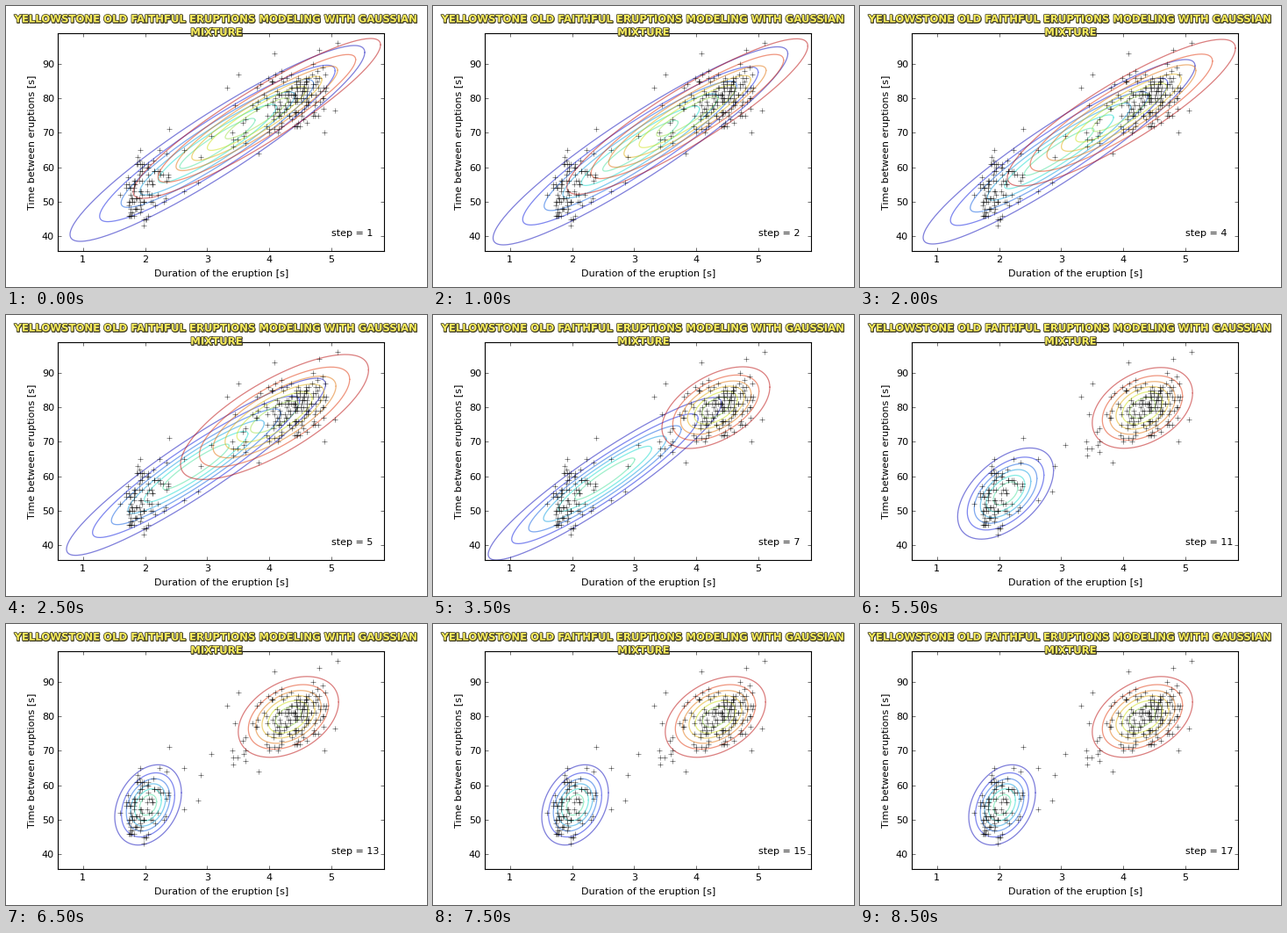
Write a matplotlib script that moves like this. It is 480 px wide and 320 px high and loops after 9 s.

```python
import numpy as np
import matplotlib.pyplot as plt
from matplotlib import patheffects as pe
from matplotlib.animation import FuncAnimation

W, H, DPI = 480, 320, 80
XLIM, YLIM = (0.6, 5.85), (35.6, 98.8)
LEFT, RIGHT, TOP, BOTTOM = 59.4, 431.4, 31.4, 279.4
PEAK = 6.8  # height of each Gaussian in contour steps

plt.rcParams.update({"font.family": "DejaVu Sans", "font.size": 10})

# key poses by step: centre x, y, half width, half height (px), correlation
LOW = {
    1: (241, 156.5, 168, 111.5, 0.93),
    3: (232, 162, 168, 114, 0.93),
    4: (227, 166, 155, 105, 0.93),
    7: (196, 186.5, 133, 92.5, 0.93),
    9: (176, 198, 78, 62, 0.75),
    10: (168, 202, 63, 55, 0.61),
    13: (162, 206, 38, 45.7, 0.3),
}
HIGH = {
    1: (286, 128, 141, 91, 0.92),
    4: (298, 121.5, 130, 83.5, 0.88),
    7: (322.5, 105.5, 61.5, 46.5, 0.5),
    9: (326, 104.5, 48, 39.5, 0.31),
    10: (322, 105.8, 57.2, 46, 0.37),
}

OUTLIERS = [(1.6, 52), (1.98, 43), (2.38, 71), (2.63, 65), (2.62, 53), (2.85, 55.5),
            (2.9, 63), (3.07, 69), (3.83, 64), (3.32, 83), (3.45, 78), (3.5, 87),
            (4.08, 93), (4.8, 94), (5.1, 96), (5.05, 76.5)]


def cluster(rng, n, start, span, a, b, mean, slope, spread, lo, hi):
    """Durations on a 1/60 grid with whole waiting times between lo and hi."""
    d = np.round((start + span * rng.beta(a, b, 4 * n)) * 60) / 60
    w = np.round(mean + slope * (d - d.mean()) + rng.normal(0, spread, 4 * n))
    keep = (w >= lo) & (w <= hi)
    return np.column_stack([d, w])[keep][:n]


def to_data(px, py):
    sx = (XLIM[1] - XLIM[0]) / (RIGHT - LEFT)
    sy = (YLIM[1] - YLIM[0]) / (BOTTOM - TOP)
    return XLIM[0] + (px - LEFT) * sx, YLIM[0] + (BOTTOM - py) * sy


def pose(keys, step):
    return [np.interp(step, list(keys), col) for col in zip(*keys.values())]


rng = np.random.default_rng(12)
points = np.vstack([
    OUTLIERS,
    cluster(rng, 92, 1.7, 0.72, 1.0, 1.7, 54, 9, 6, 45, 65),
    cluster(rng, 9, 3.32, 0.45, 1, 1.5, 69, 8, 3, 64, 75),
    cluster(rng, 155, 3.62, 1.38, 2.5, 1.9, 80, 6, 5, 70, 91),
])

fig = plt.figure(figsize=(W / DPI, H / DPI), dpi=DPI, facecolor="white")
ax = fig.add_axes([LEFT / W, 1 - BOTTOM / H, (RIGHT - LEFT) / W, (BOTTOM - TOP) / H])
ax.set(xlim=XLIM, ylim=YLIM, xticks=range(1, 6), yticks=range(40, 91, 10))
ax.tick_params(direction="in", length=4, width=0.5, pad=4, top=True, right=True)
for spine in ax.spines.values():
    spine.set_linewidth(1)

ax.plot(points[:, 0], points[:, 1], "k+", ms=6.2, mew=0.5, alpha=0.75, zorder=3)
label = ax.text(5, 40, "", zorder=4)


def put(x, y, text, **kw):
    return fig.text(x / W, 1 - y / H, text, ha="center", **kw)


put(246, 305.4, "Duration of the eruption [s]", va="center")
put(29.8, 155.6, "Time between eruptions [s]", va="center", rotation=90)

ink = "#45422a"
glow = [pe.Stroke(offset=(0.4, -0.6), linewidth=1.4, foreground=ink),
        pe.Stroke(linewidth=1.4, foreground=ink), pe.Normal()]
for base, line in ((18.5, "YELLOWSTONE OLD FAITHFUL ERUPTIONS MODELING WITH GAUSSIAN"),
                   (33.6, "MIXTURE")):
    put(240, base, line, va="baseline", size=10.5, weight="bold",
        color="#faee5c", path_effects=glow)

theta = np.linspace(0, 2 * np.pi, 181)
levels = range(1, int(PEAK) + 1)


def make_rings(cool):
    rings = []
    for level in levels:
        tone = 0.5 * level / PEAK
        rgb = np.array(plt.cm.jet(tone if cool else 1 - tone)[:3]) * 0.88
        rings += ax.plot([], [], color=rgb, lw=1.15, alpha=0.5, zorder=2)
    return rings


groups = [(LOW, make_rings(True)), (HIGH, make_rings(False))]


def draw(i):
    step = max(1, i)
    label.set_text(f"step = {step}")
    for keys, rings in groups:
        cx, cy, hx, hy, rho = pose(keys, step)
        for level, ring in zip(levels, rings):
            # contours of a Gaussian at evenly spaced densities
            s = np.sqrt(np.log(PEAK / level) / np.log(PEAK))
            ring.set_data(*to_data(cx + s * hx * np.cos(theta),
                                   cy - s * hy * np.cos(theta - np.arccos(rho))))
    return [label]


anim = FuncAnimation(fig, draw, frames=18, interval=500, repeat=True,
                     repeat_delay=0, blit=False)
plt.show()
```
